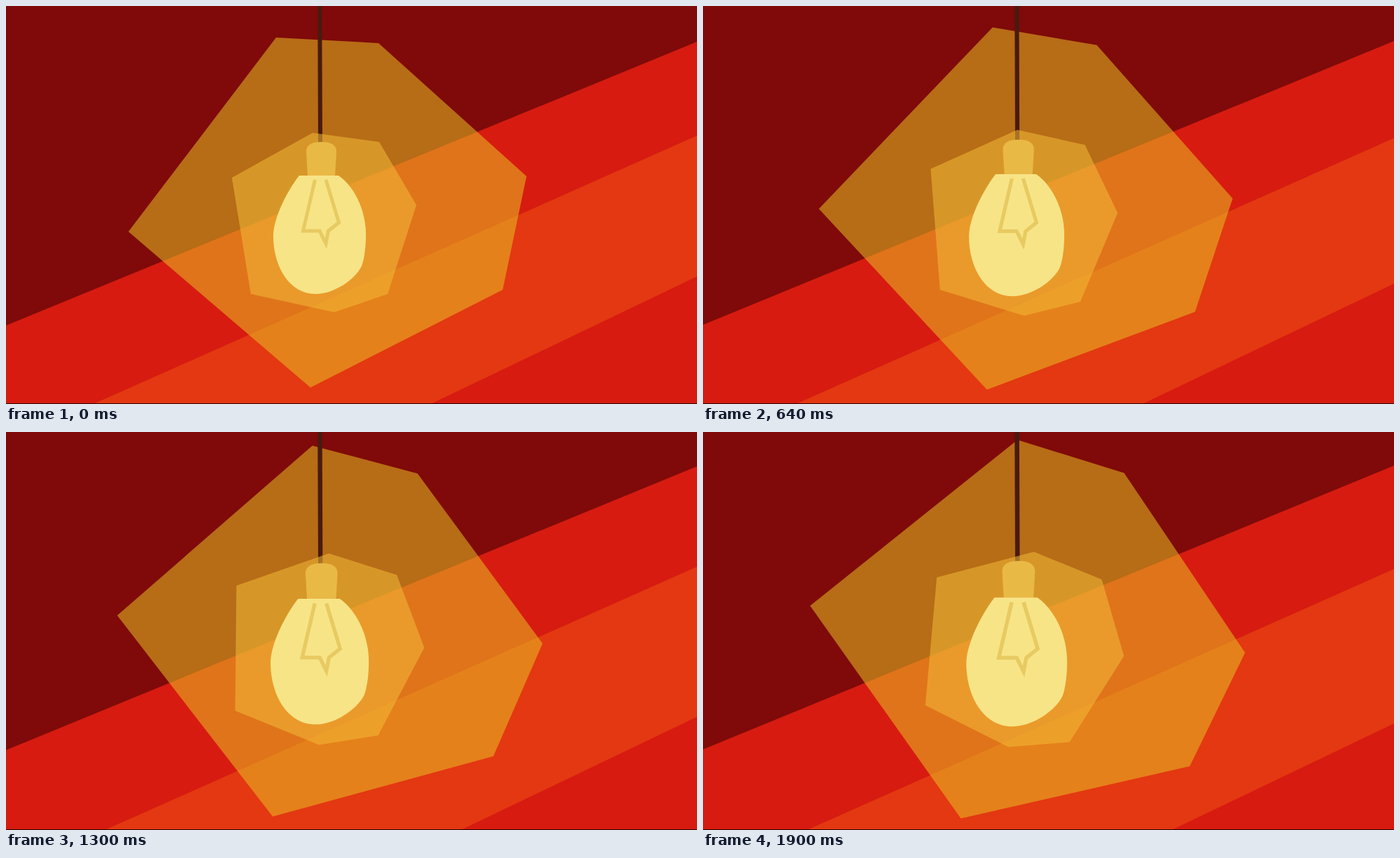
An HTML page that plays this animation: 985x568 px, repeating every 1.92 s.

```html
<!DOCTYPE html>
<html lang="en">
<head>
<meta charset="utf-8">
<title>Glowing bulb</title>
<style>
  html, body { margin: 0; width: 100%; height: 100%; overflow: hidden; background: #7f0a09; }
  svg { display: block; width: 985px; height: 568px; }
</style>
</head>
<body>
<svg viewBox="0 0 985 568">
  <rect width="985" height="568" fill="#7f0a09"/>
  <g class="zoom">
    <path d="M-100 497L1100 3.7V900H-100Z" fill="#d71b10"/>
    <path d="M-100 668L1100 133.8V331L-100 906Z" fill="#e33811"/>
  </g>

  <g class="zoom">
    <polygon id="halo" points="385,45 531,53 742,243 708,405 434,544.500 174.500,322"
             fill="#e9c322" fill-opacity=".53"/>
    <path d="M447 -60L448 195" stroke="#491a10" stroke-width="6"/>
    <polygon id="glow" points="437,181 532,194 585,284 544,411 468,437 349,411 322,245"
             fill="#f3ba38" fill-opacity=".55"/>
    <path d="M430 242L428 208C428 198 436 194 449.500 194S471 198 471 208L469 242Z" fill="#e9b946"/>
    <path d="M418 242H474C497 258 513 292 513 326C513 343 511 360 507 371C498 390 468 411 441 411C404 411 381 372 381 328C381 302 402 262 418 242Z" fill="#f7e487"/>
    <path d="M440.500 248L423.500 321H447L456 339L459.500 321L474.500 309L456 248"
          fill="none" stroke="#e8ca62" stroke-width="5"/>
  </g>
  <rect y="567" width="985" height="1" fill="#2a0503"/>
</svg>
<script>
  const LOOP = 1920, STEP = 20;
  const zoomed = document.querySelectorAll('.zoom');
  const halo = document.getElementById('halo');
  const glow = document.getElementById('glow');
  const move = (node, transform) => node.setAttribute('transform', transform);

  function draw(ms) {
    const scale = 1 + 0.0885 * ms / 1900;
    const zoom = `translate(445 306) scale(${scale}) translate(-445 -306)`;
    zoomed.forEach(node => move(node, zoom));

    // The outer halo eases out while the inner glow turns steadily.
    const haloAngle = 14.3 * Math.sin(Math.PI / 2 * ms / 2130);
    move(halo, `rotate(${haloAngle} 456 295)`);
    move(glow, `rotate(${14.35 * ms / 1900} 449 311)`);
  }

  function tick(now) {
    draw(Math.floor(now % LOOP / STEP) * STEP);
    requestAnimationFrame(tick);
  }
  draw(0);
  requestAnimationFrame(tick);
</script>
</body>
</html>
```
